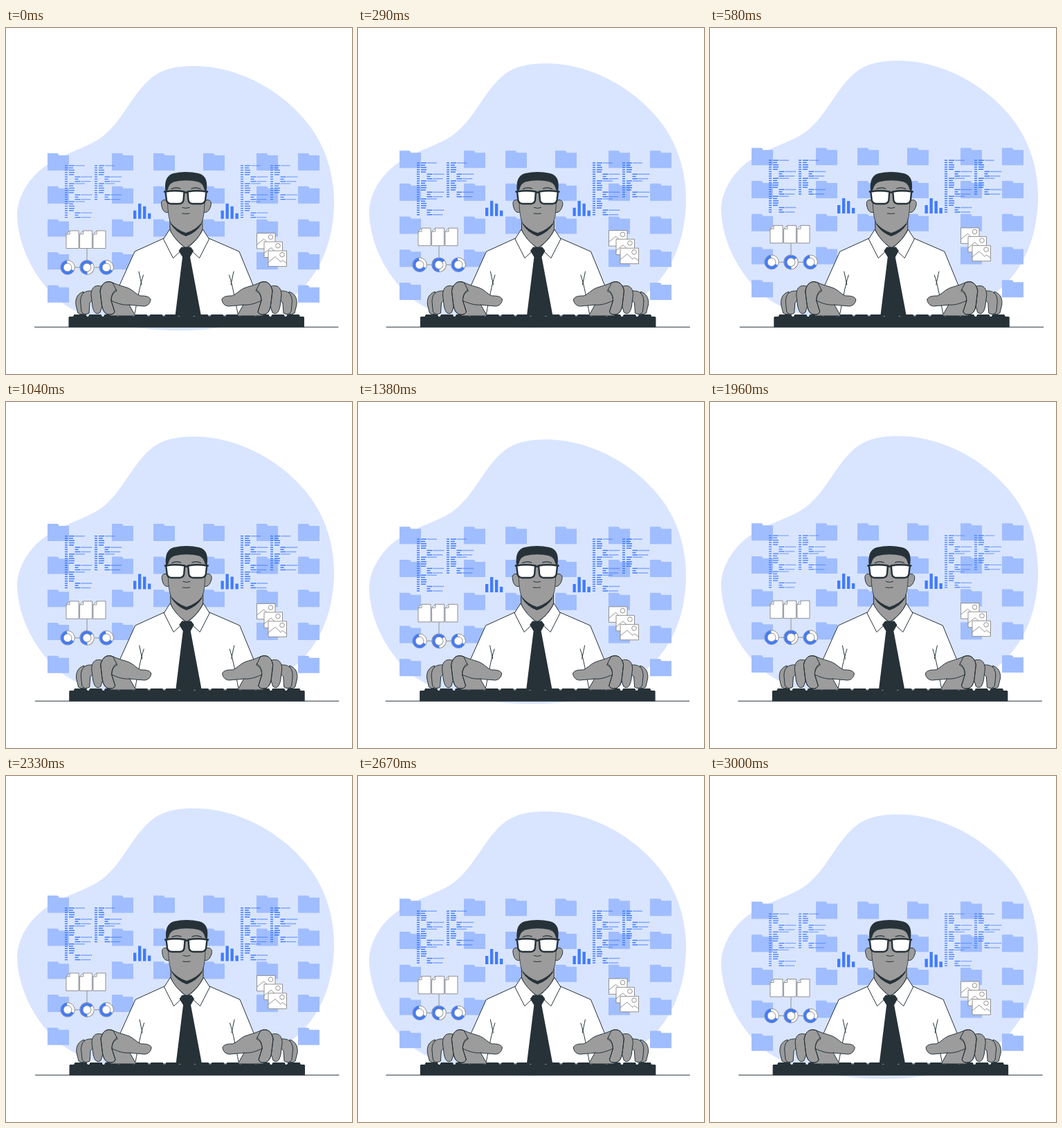
An HTML page for the animation above (3040 ms loop, 500 by 500 pixels).

```html
<!DOCTYPE html>
<html lang="en">
<head>
<meta charset="utf-8">
<title>Working at the keyboard</title>
<style>
  html, body { margin: 0; width: 100%; height: 100%; overflow: hidden; background: #fff; }
  svg { display: block; width: 100%; height: 100%; }
  .dark { fill: #263238; }
  .skin { fill: #9c9c9c; stroke: #263238; stroke-linejoin: round; }
  .shirt { fill: #fff; stroke: #263238; stroke-linejoin: round; }
  .line { fill: none; stroke: #263238; stroke-linecap: round; }
  .paper { fill: #fff; stroke: #858585; stroke-width: .9; stroke-linejoin: round; }
  .thin { fill: none; stroke: #858585; stroke-width: .9; }
  .blue { fill: #407bff; }
</style>
</head>
<body>
<svg viewBox="0 0 500 500">
  <defs>
    <path id="folder" fill="#a0bdff" d="M0 0H14Q15.500 0 16 1.500L16.500 3H31V25H0Z"/>
    <g id="picture">
      <path class="paper" d="M0 0H26.500V22.500H0Z"/>
      <path class="thin" d="M0 16.500L10 8.500L18 16L20.500 13.500L26.500 18"/>
      <circle class="thin" cx="20" cy="5.700" r="3.300"/>
    </g>
    <g id="sheet">
      <path class="paper" d="M5 0H18V25.500H0V5Z"/>
      <path class="thin" d="M0 5H5V0"/>
    </g>
    <g id="donut">
      <circle class="paper" r="10.300"/>
      <path class="blue" d="M0 0L-1 -10A10 10 0 1 0 9 4.500Z"/>
      <circle class="paper" r="6"/>
    </g>
    <path id="bars" class="blue" d="M0 12h4.300v12h-4.300zM7 2h4.300v22h-4.300zM14 6h4.300v18h-4.300zM21 16h4.300v8h-4.300z"/>
    <g id="hand">
      <path class="skin" d="M138 376C142 368 148 366 154 368C163 372 169 373 177 376C184 379 188 385 194 387C202 387 207 388 209 392C209 397 205 402 199 402C191 401 184 401 178 400L187 416H150L138 398Z"/>
      <path class="skin" d="M112 381C103 384 100 391 101 400L104 412Q108 415 113 413L112 396Z"/>
      <path class="skin" d="M125 380C113 379 108 384 107.500 395L109 410Q113 416 120 412L121 397L128 390Z"/>
      <path class="skin" d="M140 374C130 370 123 374 123 386L125 402C127 412 131 415 136 411L142 392Z"/>
      <path class="skin" stroke="none" d="M154 368C145 364 138 369 136 380L138 397C139 407 142 413 148 414Q155 415 157 410L152 394C152 387 155 382 160 380Z"/>
      <path class="line" d="M154 368C145 364 138 369 136 380L138 397C139 407 142 413 148 414Q155 415 157 410L152 394C152 387 154 382 159 378M152 394C161 398 169 401 178 400"/>
    </g>
    <g id="side">
      <path class="line" d="M192 352L196 371M198.500 357C193.500 372 190 392 186 413"/>
      <path class="shirt" d="M236.500 291L227.500 305L241.500 332.500L258 317C249 310 241 301 236.500 291Z"/>
    </g>
    <g id="lens">
      <path d="M230.500 236.500Q244 234 257.500 236.500L256.500 249Q255.500 253.500 250.500 254H238.500Q233 253.500 232 249Z" fill="#fff" stroke="#263238" stroke-width="2.400"/>
      <path class="line" stroke-width="1.200" d="M239 232.500Q245 229.500 252 232"/>
    </g>
  </defs>

  <g id="scene">
    <path fill="#d9e5ff" d="M272 55C340 55 405 95 440 143C468 182 475 225 474 258C472 310 455 350 425 380C380 420 320 437 255 437C190 437 125 427 85 400C47 372 16.500 320 16 268C18 238 38 211 62 196C85 182 105 176 125 166C167 145 178 96 214 69C232 57 252 55 272 55Z"/>
    <g id="folders"></g>
    <path id="code" class="blue"/>
    <use href="#bars" x="184" y="251.700"/>
    <use href="#bars" x="310.500" y="251.700"/>
    <path class="thin" d="M117 319V336M89 346H145"/>
    <use href="#sheet" x="87" y="293"/>
    <use href="#sheet" x="106.500" y="293"/>
    <use href="#sheet" x="126" y="293"/>
    <use href="#donut" transform="translate(89 346)"/>
    <use href="#donut" transform="translate(117 346) rotate(60)"/>
    <use href="#donut" transform="translate(145 346)"/>
    <use href="#picture" x="362.500" y="296.500"/>
    <use href="#picture" x="373" y="309"/>
    <use href="#picture" x="379" y="322"/>
  </g>

  <g id="man">
    <path class="shirt" d="M230 303L186 323L163 374L160 416H361L358 374L337 323L291 303Z"/>
    <path class="skin" d="M237 275V291C240 301 250 311 260 318C271 311 280 301 284 291V275Z"/>
    <path class="dark" d="M238 283Q246 296 260 301Q275 296 283 283Z"/>
    <path class="skin" d="M234 250C227 246 223 250 225 257C226 264 230 268 235 266ZM286 250C293 246 298 250 296 257C294 264 290 268 285 266Z"/>
    <path class="skin" stroke-width=".8" d="M232.500 230L234 262Q235 274 237.500 281Q246 292 260 296.500Q275 292 283 281Q286 273 286.500 262L288 230Q276 217 260 217Q243 217 232.500 230Z"/>
    <path class="dark" d="M230.500 237C228.500 222 232 212.500 242 210Q260 206 278 210C289 212.500 292 222 289.500 237L286.500 233C285 227 283 224 279 222.500Q260 218 242 222.500C238 224 235.500 227 234 233Z"/>
    <path class="line" stroke-width="2.400" d="M257 238.500Q260 236.500 263 238.500M231 237L229 236.500M289 237L291 236.500"/>
    <use href="#lens"/>
    <use href="#lens" transform="matrix(-1 0 0 1 520 0)"/>
    <path class="line" d="M255 259.500Q260 261.500 265 259.500M254.500 268Q260 269 265 268"/>
    <use href="#side"/>
    <use href="#side" transform="matrix(-1 0 0 1 521 0)"/>
    <path class="dark" d="M253.500 316.500H267L271 322L266 331L282 416H244.500L255 331L249.500 322Z"/>
    <path class="dark" id="keys"/>
    <use href="#hand"/>
    <use href="#hand" transform="matrix(-1 0 0 1 521 0)"/>
    <path class="dark" d="M90.500 418.500Q90.500 417 92 417H429.500Q431 417 431 418.500V432.500H90.500Z"/>
    <path class="line" d="M41.500 432.200H480"/>
  </g>
</svg>
<script>
  const LOOP = 3040, LEAD = 45;
  const $ = id => document.getElementById(id);
  const bar = (x, y, w) => `M${x} ${y}h${w}v1.4h${-w}z`;

  // Folder grid; the lower rows are mostly hidden by the man
  const columns = [60, 153, 213, 285, 362, 422];
  const shown = [columns, columns, columns, [60, 153, 362, 422], [60, 422]];
  $('folders').innerHTML = shown.map((xs, row) =>
    xs.map(x => `<use href="#folder" x="${x}" y="${181 + row * 47.7}"/>`).join('')).join('');

  // Code lines: [indent, dash width, dot count], repeated every eight rows
  const rows = [[6, 8, 7], [6, 6, 0], [6, 8, 0], [6, 8, 0], [6, 7, 0], [14.5, 8, 8], [14.5, 5, 0], [14.5, 8, 7]];
  function codeBlock(x, count) {
    let d = '';
    for (let i = 0; i < count; i++) {
      const [indent, width, dots] = rows[i % 8], y = 198.2 + i * 3.25;
      d += bar(x, y, 4) + bar(x + indent, y, width);
      for (let k = 0; k < dots; k++) d += bar(x + indent + width + 1.3 + k * 2, y, 1.2);
    }
    return d;
  }
  $('code').setAttribute('d',
    codeBlock(85, 24) + codeBlock(128, 16) + codeBlock(339, 24) + codeBlock(382, 16));

  let keyPath = '';
  for (let x = 97; x < 420; x += 22) keyPath += `M${x} 417l1.500 -3h17l1.500 3z`;
  $('keys').setAttribute('d', keyPath);

  // Linear float, up and down twice per loop
  const float = t => -10 * (1 - Math.abs(1 - 2 * (t / 1520 % 1)));

  // Sideways shake through evenly spaced stops
  const stops = [0, -1, 2, -4, 4, -4, 4, -4, 2, -1, 0];
  function shake(t) {
    const p = t % LOOP / LOOP * 10, i = Math.floor(p);
    return stops[i] + (stops[i + 1] - stops[i]) * (p - i);
  }

  const start = performance.now();
  function draw() {
    const t = Math.max(0, performance.now() - start) + LEAD;
    $('scene').setAttribute('transform', `translate(0 ${float(t) - float(LEAD)})`);
    $('man').setAttribute('transform', `translate(${shake(t) - shake(LEAD)} 0)`);
    requestAnimationFrame(draw);
  }
  draw();
</script>
</body>
</html>
```
